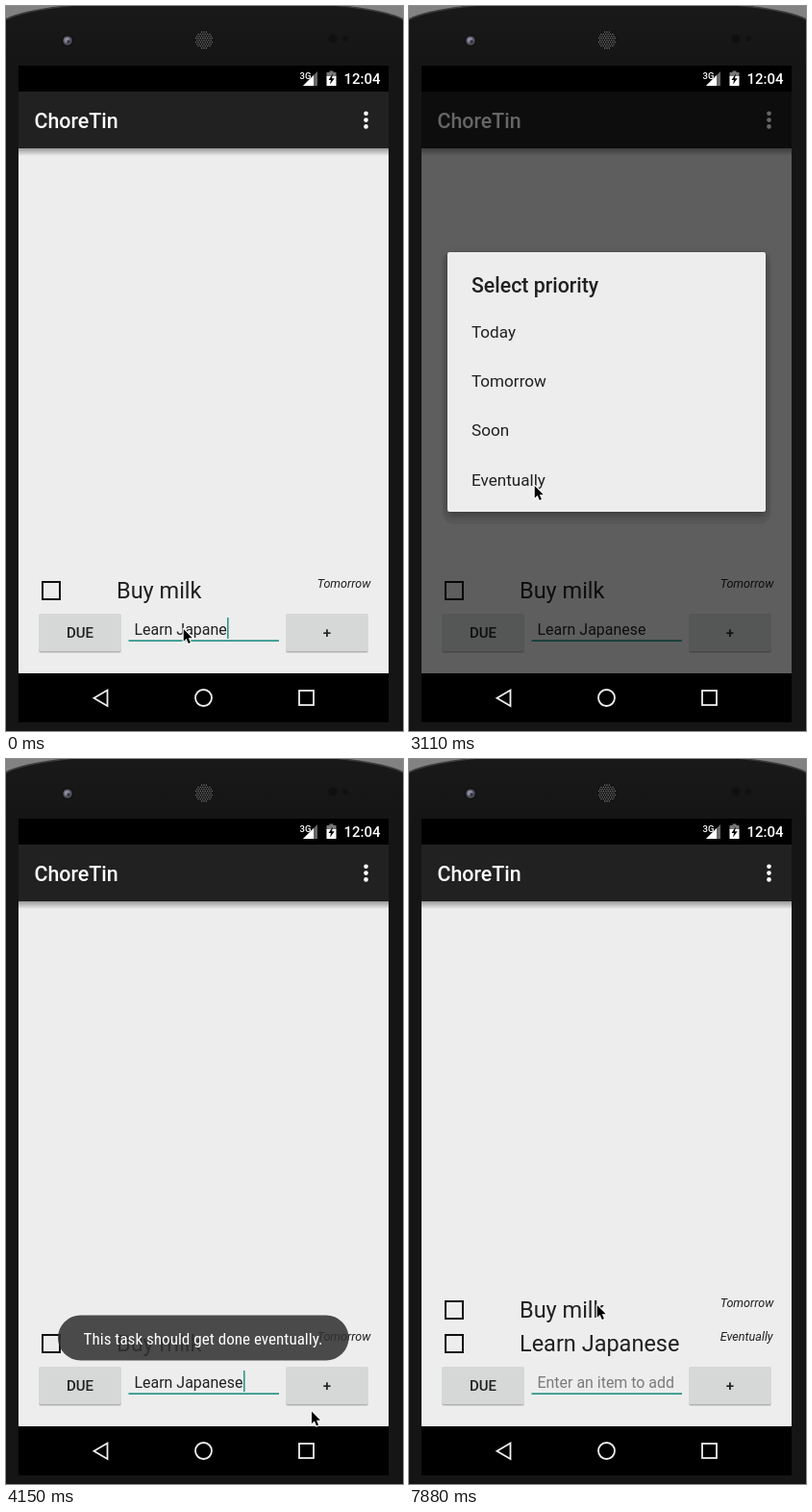
These frames come from a looping animation (413x754 px, 8000 ms). An HTML page with a canvas:

```html
<!DOCTYPE html>
<html lang="en">
<head>
<meta charset="utf-8">
<title>ChoreTin</title>
<style>
html, body { margin: 0; width: 100%; height: 100%; overflow: hidden; background: #161616; }
canvas { display: block; width: 413px; height: 754px; }
</style>
</head>
<body>
<canvas id="stage"></canvas>
<script>
const W = 413, H = 754, LOOP = 8000, STEP = 148.3;
const TEAL = '#30968a', PAPER = '#ededed', INK = '#202020';
const TYPED = 4, OPEN = 14, CLOSE = 22, CLOSED = 24, RESUMED = 28, ADDED = 39, RESET = 43;
// Pointer glides: first step, last step, x, y, upward bow
const GLIDES = [
  [4, 8, 327, 645, 12], [8, 13, 78, 653, 0], [16, 20, 130, 498, 0],
  [24, 29, 325, 685, 0], [29, 31, 327, 658, 0], [52, 53, 195, 567, 0]
];

const cv = document.getElementById('stage');
const ratio = window.devicePixelRatio || 1;
cv.width = W * ratio;
cv.height = H * ratio;
const c = cv.getContext('2d');

const ramp = (k, a, b) => Math.min(1, Math.max(0, (k - a) / (b - a)));
const pulse = (k, a, b, d, e) => Math.min(ramp(k, a, b), 1 - ramp(k, d, e));
const easeOut = p => 1 - (1 - p) ** 2;

function rect(x, y, w, h, fill, r = 0) {
  c.beginPath();
  c.roundRect(x, y, w, h, r);
  c.fillStyle = fill;
  c.fill();
}

function frame(x, y, w, h, color, width) {
  c.strokeStyle = color;
  c.lineWidth = width;
  c.strokeRect(x, y, w, h);
}

function disc(x, y, r, fill) {
  c.beginPath();
  c.arc(x, y, r, 0, 7);
  c.fillStyle = fill;
  c.fill();
}

function poly(points, fill, stroke, width) {
  c.beginPath();
  points.forEach(p => c.lineTo(p[0], p[1]));
  c.closePath();
  if (stroke) {
    c.strokeStyle = stroke;
    c.lineWidth = width;
    c.stroke();
  }
  if (fill) {
    c.fillStyle = fill;
    c.fill();
  }
}

function font(style) {
  c.font = style + ' Roboto, sans-serif';
}

function text(str, x, y, style, fill = INK, align = 'left') {
  font(style);
  c.fillStyle = fill;
  c.textAlign = align;
  c.fillText(str, x, y);
}

function vertical(y0, y1, from, to) {
  const g = c.createLinearGradient(0, y0, 0, y1);
  g.addColorStop(0, from);
  g.addColorStop(1, to);
  return g;
}

function phone() {
  rect(0, 0, W, H, '#828282');
  c.beginPath();
  c.moveTo(-2, 15);
  c.quadraticCurveTo(14, 5, 72, -1);
  c.lineTo(W - 72, -1);
  c.quadraticCurveTo(W - 14, 5, W + 2, 15);
  c.lineTo(W + 2, H + 3);
  c.lineTo(-2, H + 3);
  c.closePath();
  c.fillStyle = vertical(0, 62, '#191919', '#151515');
  c.fill();
  c.strokeStyle = '#3c3c3c';
  c.lineWidth = 1.5;
  c.stroke();

  disc(64, 36, 6, '#0e0e10');
  disc(64, 36, 4.8, '#505058');
  disc(63.5, 35.5, 2.8, '#8c8ea4');
  disc(65, 37, 1.8, '#34353f');
  disc(206, 35.5, 10, '#111');
  for (let j = -4; j <= 4; j++) {
    for (let i = -4; i <= 4; i++) {
      const x = (i + (j & 1) / 2) * 2.4, y = j * 2.1;
      if (x * x + y * y < 88) disc(206 + x, 35.5 + y, 0.8, '#6c6c6c');
    }
  }
  disc(340, 34, 4.5, '#101010');
  disc(353, 34, 3, '#111');
}

function bars() {
  rect(13, 62, 385, 27, '#000');
  text('3G', 305.5, 76, '500 9.5px', '#fff');
  poly([[309, 83], [324, 83], [324, 68]], '#666');
  poly([[309, 83], [320, 83], [320, 72]], '#fff');
  rect(336.5, 67.5, 4, 2, '#777');
  rect(333.5, 69, 10, 5, '#777', 0.5);
  rect(333.5, 73, 10, 10, '#fff', 0.5);
  poly([[340, 70.5], [335.5, 77], [338, 77], [337, 81.5], [341.7, 75.3], [339, 75.3]], '#000');
  text('12:04', 389.5, 81, '500 15px', '#fff', 'right');

  rect(13, 694, 385, 51, '#000');
  poly([[91.5, 719.7], [105.5, 711.5], [105.5, 728]], null, '#eee', 1.8);
  c.beginPath();
  c.arc(205.5, 719.5, 8.5, 0, 7);
  c.stroke();
  frame(305, 712, 15, 15, '#eee', 1.8);
}

function row(label, due, y) {
  frame(38, y - 9, 18, 18, '#111', 2);
  text(label, 115, y + 8, '23.5px');
  text(due, 323.7, y - 3, 'italic 12.6px');
}

function button(label, x, press) {
  rect(x, 633, 86, 40, 'rgba(0,0,0,.12)', 2);
  rect(x + 0.5, 633, 85, 39, 'rgba(0,0,0,.15)', 2);
  rect(x, 632, 86, 39, '#d6d8d7', 2);
  rect(x, 632, 86, 39, `rgba(0,0,0,${press * 0.14})`, 2);
  text(label, x + 43, 657, '500 15px', INK, 'center');
}

// The caret blinks every three steps and restarts after each event
function caretOn(k) {
  if (k >= OPEN && k <= CLOSED) return false;
  const since = k < OPEN ? Math.max(0, k - TYPED) : k - (k < ADDED ? RESUMED : RESET);
  return Math.floor(since / 3) % 2 === 0;
}

function field(k) {
  const size = '15.95px';
  const str = k < ADDED ? 'Learn Japanese'.slice(0, 12 + Math.max(0, k - 1)) : '';
  if (str) text(str, 133.5, 654, size);
  else text('Enter an item to add', 133.5, 654, size, '#7a7a7a');
  rect(127.5, 659.2, 156.5, 1.8, TEAL);
  if (caretOn(k)) {
    font(size);
    rect(Math.round(133.7 + c.measureText(str).width), 636, 1.6, 22, TEAL);
  }
}

function app(k) {
  rect(13, 148, 385, 546, PAPER);
  rect(13, 148, 385, 8, vertical(148, 156, 'rgba(0,0,0,.36)', 'rgba(0,0,0,0)'));
  rect(13, 89, 385, 59, '#212121');
  text('ChoreTin', 29.5, 126.5, '500 21.4px', '#fff');
  for (let i = -1; i <= 1; i++) disc(374.5, 118.6 + i * 6.8, 2.3, '#fff');
  const items = [['Buy milk', 'Tomorrow']];
  if (k >= ADDED) items.unshift(['Learn Japanese', 'Eventually']);
  items.forEach(([label, due], i) => row(label, due, 608 - 35 * i));
  button('DUE', 34, pulse(k, OPEN, OPEN + 1, OPEN + 2, OPEN + 4));
  button('+', 291, pulse(k, ADDED - 2, ADDED - 1, ADDED + 1, RESET));
  field(k);
}

function dialog(k) {
  const gone = ramp(k, CLOSE, CLOSED);
  const dim = 0.6 * ramp(k, OPEN + 0.1, OPEN + 4.2) * (1 - gone);
  const alpha = ramp(k, OPEN + 0.4, OPEN + 2) * (1 - gone);
  if (alpha <= 0) return;
  rect(13, 89, 385, 605, `rgba(0,0,0,${dim})`);
  c.save();
  c.globalAlpha = alpha;
  for (const e of dim < 0.5 ? [9, 5] : [5]) {
    rect(40 - e, 260 - e, 331 + 2 * e, 274 + 2 * e, 'rgba(0,0,0,.06)', 12);
  }
  c.shadowColor = 'rgba(0,0,0,.35)';
  c.shadowBlur = 8 * ratio;
  c.shadowOffsetY = 3 * ratio;
  rect(40, 256, 331, 270, PAPER, 2);
  c.shadowColor = 'transparent';
  text('Select priority', 65, 298, '500 21.3px');
  ['Today', 'Tomorrow', 'Soon', 'Eventually'].forEach((s, i) => text(s, 65, 345 + i * 51.2, '17.1px'));
  c.restore();
}

function toast(k) {
  const alpha = pulse(k, 24, 26.5, 36.4, 40.2);
  if (alpha <= 0) return;
  c.save();
  c.globalAlpha = alpha;
  rect(54, 578.5, 302.5, 47, 'rgba(50,50,50,.87)', 23.5);
  c.font = "condensed 17.1px 'Roboto Condensed', Roboto, sans-serif";
  c.textAlign = 'center';
  c.fillStyle = '#fff';
  c.fillText('This task should get done eventually.', 205, 608.5);
  c.restore();
}

function pointer(k) {
  let x = 184, y = 647;
  for (const [a, b, toX, toY, bow] of GLIDES) {
    const p = easeOut(ramp(k, a, b));
    x += (toX - x) * p;
    y += (toY - y) * p - bow * Math.sin(Math.PI * p);
  }
  c.save();
  c.translate(x, y);
  c.scale(0.94, 0.94);
  c.lineJoin = 'round';
  poly([[0.8, 1], [0.8, 14.6], [3.9, 11.7], [6.2, 17], [8.4, 16], [6.2, 11], [10.4, 11]], '#000', '#fff', 2.4);
  c.restore();
}

function draw(t) {
  const k = Math.min(53, Math.floor((t + 8) / STEP));
  c.setTransform(ratio, 0, 0, ratio, 0, 0);
  phone();
  app(k);
  dialog(k);
  bars();
  toast(k);
  pointer(k);
}

const start = performance.now();
function tick() {
  draw((performance.now() - start) % LOOP);
  requestAnimationFrame(tick);
}
tick();
</script>
</body>
</html>
```
